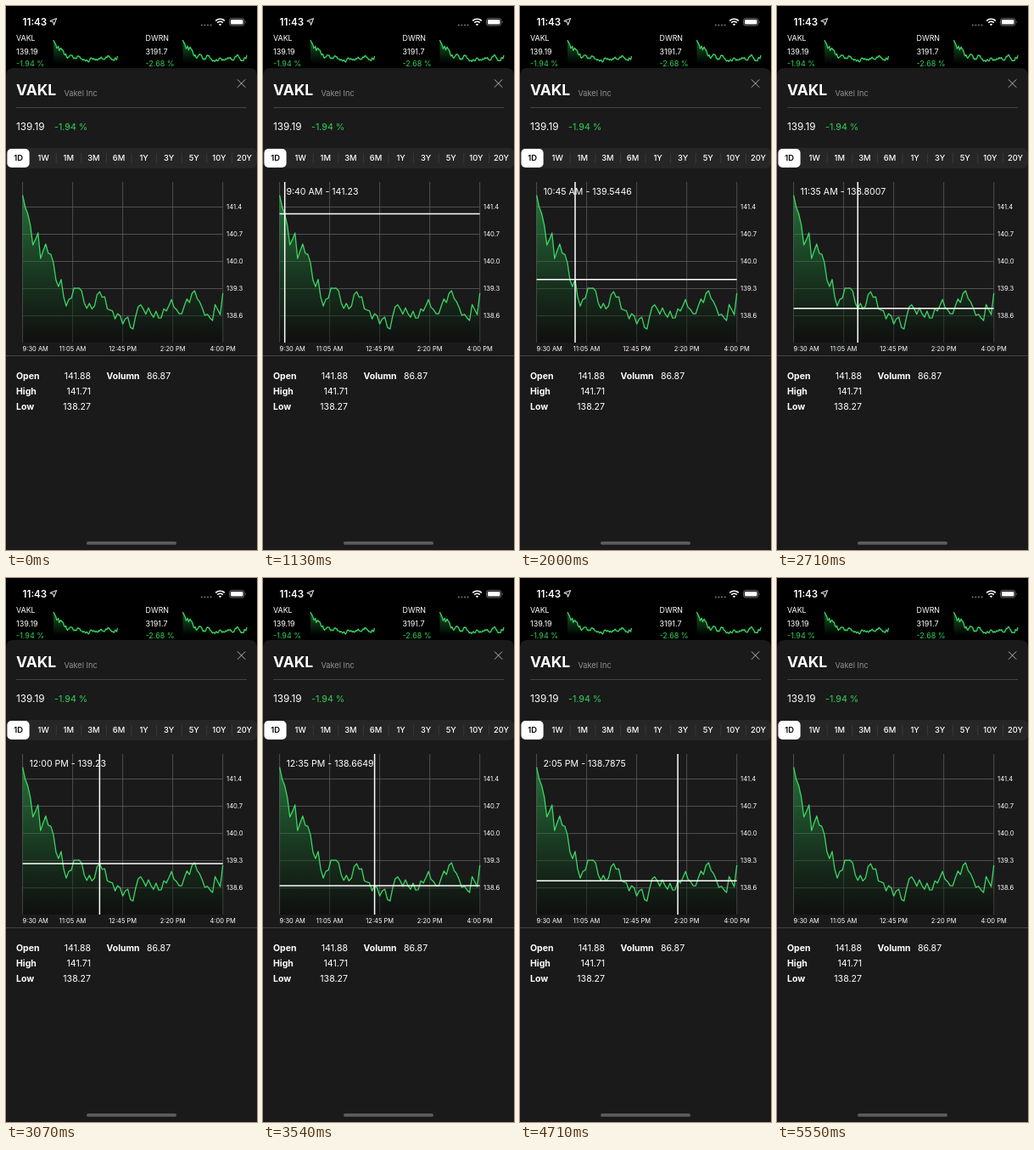
Animation of 296x640 px, one loop 6300 ms. Source, as an HTML page:

```html
<!DOCTYPE html>
<html lang="en">
<head>
<meta charset="utf-8">
<title>Stock chart</title>
<style>
  html, body { margin: 0; width: 100%; height: 100%; overflow: hidden; background: #000; }
  svg { display: block; width: 100%; height: 100%; font-family: Inter, Roboto, sans-serif; fill: #fff; }
  .line { fill: none; stroke: #3ad663; stroke-linejoin: round; }
  .cross { stroke: #fff; stroke-width: 1.5; }
</style>
</head>
<body>
<svg id="stage" viewBox="0 0 296 640">
  <defs>
    <linearGradient id="fade" x1="0" y1="0" x2="0" y2="1">
      <stop offset="0" stop-color="#34c759" stop-opacity=".5"/>
      <stop offset="1" stop-color="#000" stop-opacity=".4"/>
    </linearGradient>
  </defs>
  <rect width="296" height="640" fill="#000"/>
  <!-- status bar -->
  <path d="M59.6 14.6L56.5 22.4L55.6 18.6L51.8 17.7Z" fill="none" stroke="#fff" stroke-linejoin="round"/>
  <path d="M230.8 22.5H242" fill="none" stroke="#777" stroke-width="2" stroke-linecap="round" stroke-dasharray="0 3.6"/>
  <path d="M247.2 17.4a7.6 7.6 0 0 1 10.6 0M249.2 19.6a4.8 4.8 0 0 1 6.6 0" fill="none" stroke="#fff" stroke-width="1.7"/>
  <path d="M252.5 23.3l-1.7-1.8a2.4 2.4 0 0 1 3.4 0z"/>
  <rect x="263.5" y="14.6" width="17.4" height="8.4" rx="2.6" fill="none" stroke="#888" stroke-width=".8"/>
  <rect x="264.9" y="16" width="14.6" height="5.6" rx="1.4"/>
  <path d="M282 17.4q1.5 1.4 0 2.8z" fill="#888"/>
  <g id="behind"></g>
  <!-- sheet -->
  <path d="M0 640V82q0-9 9-9H287q9 0 9 9V640z" fill="#1a1a1a"/>
  <path d="M273 86.5l9.2 9.2m0-9.2l-9.2 9.2" stroke="#c4c4c4" stroke-width=".9"/>
  <path d="M12 119.5H284M0 411.5H296" stroke="#484848" stroke-width=".9"/>
  <rect y="167" width="296" height="24" rx="6" fill="#262626"/>
  <rect x="1.4" y="168" width="26.2" height="22" rx="5"/>
  <g id="sheet"></g>
  <g id="cursor">
    <path id="cross" class="cross"/>
    <text id="tip" x="27.4" y="221.6" font-size="10.6"></text>
  </g>
  <rect x="95" y="630" width="106" height="3.8" rx="1.9" fill="#5c5c5c"/>
</svg>
<script>
const $ = id => document.getElementById(id);
const GREEN = '#30d158';
const LOOP = 6300, PRESS = 1130, RELEASE = 5550, FPS = 8.5;
const LEFT = 19.6, RIGHT = 255.7, TOP = 207, BOTTOM = 396;
const LAST = 78;  // five-minute steps from 9:30 AM to 4:00 PM

// turning points of the day: [step, price]
const turns = [
  [0, 141.71], [2, 141.23], [4, 140.43], [6, 140.74], [7, 140.08], [9, 140.455], [11, 140.19],
  [14, 139.36], [15, 139.5446], [17, 138.86], [20, 139.32], [22, 139.32], [25, 138.8007],
  [28, 138.86], [30, 139.23], [36, 138.53], [37, 138.6649], [39, 138.4], [41, 138.575],
  [43, 138.27], [45, 138.84], [54, 138.56], [58, 139.03], [61, 138.66], [67, 139.255],
  [68, 139.055], [71, 138.62], [74, 138.49], [75, 138.9], [77, 138.64], [78, 139.19]];

// path of the finger: [tick, step]
const drag = [[9, 2], [17, 15], [23, 25], [30, 37], [34, 78], [36, 68], [40, 55]];

function interpolate(keys, x) {
  const n = keys.findIndex(([at]) => at >= x);
  if (n < 0) return keys[keys.length - 1][1];
  const [x1, y1] = keys[n], [x0, y0] = keys[Math.max(0, n - 1)];
  return x >= x1 || n === 0 ? y1 : y0 + (y1 - y0) * (x - x0) / (x1 - x0);
}

// a small ripple fills the steps between turning points
const prices = Array.from({length: LAST + 1}, (_, i) => {
  const ripple = turns.some(([at]) => at === i) ? 0 : .11 * Math.cos(2.17 * (i - 55));
  return interpolate(turns, i) + ripple;
});

const xAt = i => LEFT + (RIGHT - LEFT) * i / LAST;
const yAt = p => 244.5 + (141.23 - p) * 45.8;

const text = (x, y, size, str, {fill = '#fff', weight = 400, anchor = 'start'} = {}) =>
  `<text x="${x}" y="${y}" font-size="${size}" fill="${fill}" font-weight="${weight}" text-anchor="${anchor}">${str}</text>`;

const path = (d, stroke, width) => `<path d="${d}" fill="none" stroke="${stroke}" stroke-width="${width}"/>`;

function area(points, bottom, width) {
  const line = 'M' + points.map(p => p.map(v => v.toFixed(2)).join()).join('L');
  return `<path d="${line}V${bottom}H${points[0][0]}Z" fill="url(#fade)"/>` +
    `<path class="line" d="${line}" stroke-width="${width}"/>`;
}

function card(x, name, price, change, wobble) {
  const spark = prices.map((p, i) => [
    x + 44 + 75.5 * i / LAST,
    40 + (yAt(p) - 222) * .163 + wobble * Math.sin(i * .55) * Math.min(1, i / 9)]);
  return text(x, 41.2, 8.9, name) + text(x, 56.7, 9, price) +
    text(x, 71.2, 9, change, {fill: GREEN}) + area(spark, 68, 1.3);
}

$('behind').innerHTML =
  text(19.6, 23.2, 11.6, '11:43', {weight: 600}) +
  card(12, 'VAKL', '139.19', '-1.94 %', 0) +
  card(164.5, 'DWRN', '3191.7', '-2.68 %', 1.2);

function tabs() {
  return ['1D', '1W', '1M', '3M', '6M', '1Y', '3Y', '5Y', '10Y', '20Y'].map((label, i) =>
    text(14.6 + 29.6 * i, 182.4, 9.4, label,
      {fill: i ? '#fff' : '#000', weight: i ? 500 : 600, anchor: 'middle'}) +
    (i > 1 ? path(`M${29.6 * i} 173V185`, '#404040', .8) : '')).join('');
}

function chart() {
  let grid = '', labels = '';
  ['9:30 AM', '11:05 AM', '12:45 PM', '2:20 PM', '4:00 PM'].forEach((label, i) => {
    const x = LEFT + (RIGHT - LEFT) / 4 * i;
    grid += `M${x} ${TOP}V${BOTTOM}`;
    labels += text(x, 406.4, 7.5, label, {anchor: i ? 'middle' : 'start'});
  });
  ['141.4', '140.7', '140.0', '139.3', '138.6'].forEach((label, i) => {
    const y = 236.5 + 32 * i;
    grid += `M${LEFT} ${y}H${RIGHT}`;
    labels += text(260, y + 2.7, 7.7, label);
  });
  return path(grid, '#5e5e5e', .8) + labels +
    area(prices.map((p, i) => [xAt(i), yAt(p)]), BOTTOM, 1.3);
}

const stats = [['Open', '141.88'], ['High', '141.71'], ['Low', '138.27']].map(([name, value], i) =>
  text(12, 439 + 18.2 * i, 10.5, name, {weight: 700}) +
  text(100, 439 + 18.2 * i, 10.6, value, {anchor: 'end'})).join('');

$('sheet').innerHTML =
  text(12, 105.4, 17.5, 'VAKL', {weight: 700}) +
  text(68.5, 105.6, 9.2, 'Vakel Inc', {fill: '#929292'}) +
  text(12, 146, 11.8, '139.19') +
  text(57, 146, 10.7, '-1.94 %', {fill: GREEN}) +
  tabs() + chart() + stats +
  text(118.5, 439, 10.5, 'Volumn', {weight: 700}) +
  text(166, 439, 10.6, '86.87');

function clock(i) {
  const min = 570 + 5 * i, hour = Math.floor(min / 60);
  return `${(hour + 11) % 12 + 1}:${String(min % 60).padStart(2, '0')} ${hour < 12 ? 'AM' : 'PM'}`;
}

function draw(t) {
  const pressed = t >= PRESS && t < RELEASE;
  $('cursor').style.display = pressed ? '' : 'none';
  if (!pressed) return;
  const i = Math.round(interpolate(drag, Math.floor(t * FPS / 1000)));
  $('cross').setAttribute('d', `M${xAt(i)} ${TOP}V${BOTTOM}M${LEFT} ${yAt(prices[i])}H${RIGHT}`);
  $('tip').textContent = `${clock(i)} - ${+prices[i].toFixed(4)}`;
}

const start = performance.now();
function tick() {
  draw((performance.now() - start) % LOOP);
  requestAnimationFrame(tick);
}
tick();
</script>
</body>
</html>
```
